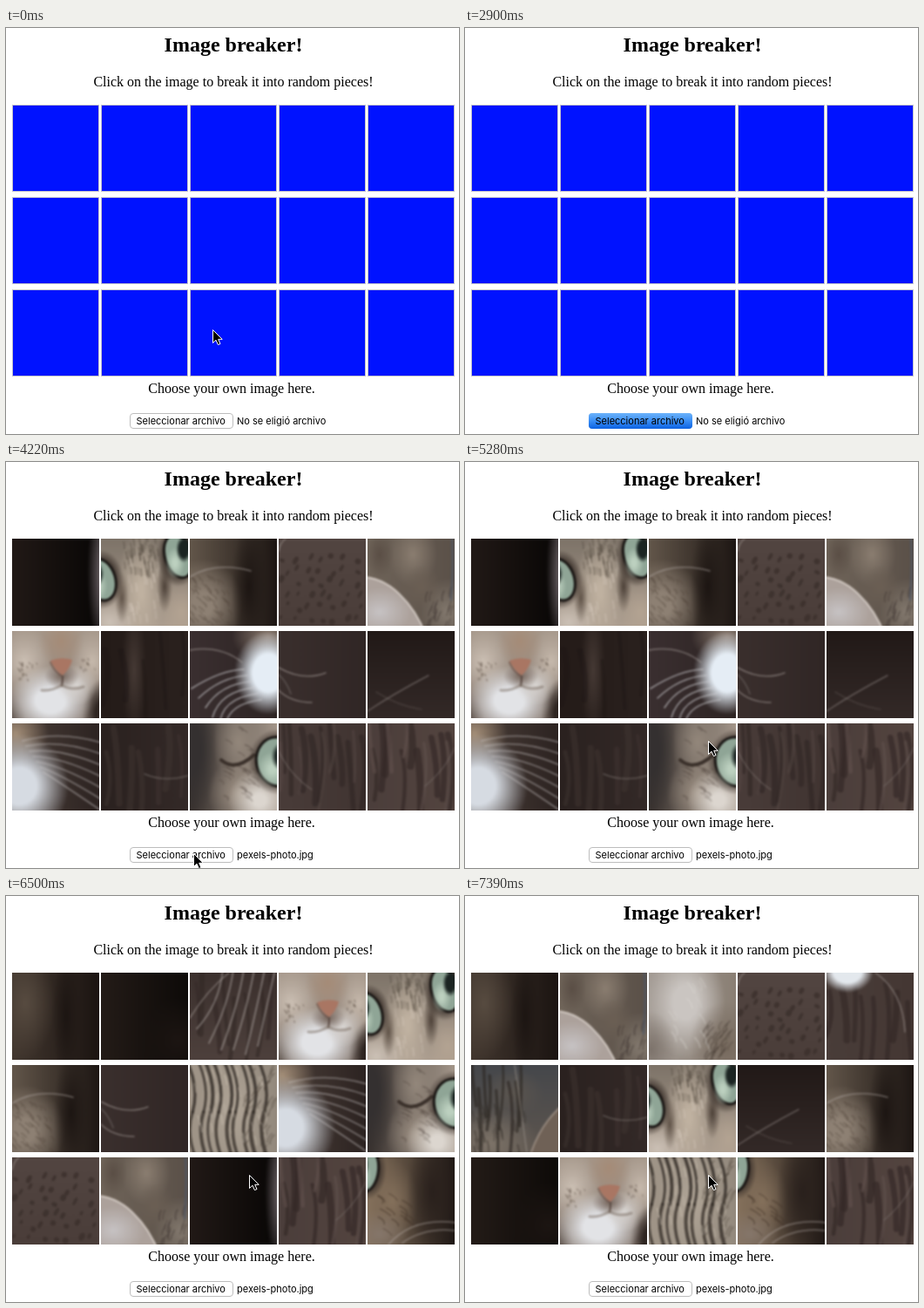
An HTML page with a canvas that plays this animation: 520 by 466 pixels, repeating every 8 s.

```html
<!DOCTYPE html>
<html lang="en">
<head>
<meta charset="utf-8">
<title>Image breaker!</title>
<style>
html, body { margin: 0; width: 100%; height: 100%; overflow: hidden; background: #fff; }
svg, canvas { position: absolute; left: 0; top: 0; }
.serif { font: 16px "Liberation Serif", "Times New Roman", serif; text-anchor: middle; }
.title { font-size: 24px; font-weight: bold; }
.ui { font: 11px Inter, Roboto, sans-serif; }
canvas, .press, .before, .after, .cursor { animation: 8s linear infinite; }
canvas, .press, .after { opacity: 0; }

/* hard cuts: 4220, 5960, 6500, 6920, 7390 ms */
.set0 { animation-name: set0; }
.set1 { animation-name: set1; }
.set2 { animation-name: set2; }
.set3 { animation-name: set3; }
.set4 { animation-name: set4; }
canvas, .press, .before, .after { animation-timing-function: step-end; }
@keyframes set0 { 0% { opacity: 0 } 52.75% { opacity: 1 } 74.5%, 100% { opacity: 0 } }
@keyframes set1 { 0% { opacity: 0 } 74.5% { opacity: 1 } 81.25%, 100% { opacity: 0 } }
@keyframes set2 { 0% { opacity: 0 } 81.25% { opacity: 1 } 86.5%, 100% { opacity: 0 } }
@keyframes set3 { 0% { opacity: 0 } 86.5% { opacity: 1 } 92.375%, 100% { opacity: 0 } }
@keyframes set4 { 0% { opacity: 0 } 92.375%, 100% { opacity: 1 } }

.press { animation-name: press; }
@keyframes press { 0% { opacity: 0 } 34% { opacity: 1 } 49.75%, 100% { opacity: 0 } }
.before { animation-name: before; }
@keyframes before { 0% { opacity: 1 } 52.75%, 100% { opacity: 0 } }
.after { animation-name: after; }
@keyframes after { 0% { opacity: 0 } 52.75%, 100% { opacity: 1 } }

.cursor { animation-name: move; }
@keyframes move {
  0%, 1.6% { transform: translate(237px, 346px) }
  3% { transform: translate(248px, 341px) }
  3.75% { transform: translate(257px, 345px) }
  4.4% { transform: translate(254px, 354px) }
  5.12%, 7.5% { transform: translate(246px, 363px) }
  9.5% { transform: translate(239px, 380px) }
  12% { transform: translate(222px, 417px) }
  14% { transform: translate(207px, 442px) }
  15.25%, 16.5% { transform: translate(203px, 449px) }
  17.125% { transform: translate(199px, 458px) }
  17.74% { transform: translate(199px, 464px) }
  17.75%, 26.74% { transform: translate(229px, 480px) }
  26.75% { transform: translate(229px, 461px) }
  29% { transform: translate(232px, 452px) }
  31.875%, 34% { transform: translate(237px, 447px) }
  36.24% { transform: translate(236px, 464px) }
  36.25%, 52.74% { transform: translate(236px, 480px) }
  52.75%, 57.2% { transform: translate(215px, 449px) }
  59.5% { transform: translate(224px, 425px) }
  62.5% { transform: translate(256px, 364px) }
  64.5% { transform: translate(276px, 329px) }
  66%, 100% { transform: translate(279px, 320px) }
}
</style>
</head>
<body>
<svg width="520" height="466">
  <defs>
    <linearGradient id="glow" x2="0" y2="1">
      <stop stop-color="#6cb3fa"/><stop offset=".5" stop-color="#3a8ef5"/><stop offset="1" stop-color="#0c62e2"/>
    </linearGradient>
    <pattern id="blank" width="102" height="106" x="7" y="88" patternUnits="userSpaceOnUse">
      <rect x=".5" y=".5" width="99" height="99" fill="#0012ff" stroke="#c4c4cc"/>
    </pattern>
  </defs>
  <text class="serif title" x="261" y="27">Image breaker!</text>
  <text class="serif" x="261" y="67">Click on the image to break it into random pieces!</text>
  <rect class="before" x="7" y="88" width="510" height="318" fill="url(#blank)"/>
  <text class="serif" x="259" y="419">Choose your own image here.</text>
  <rect x="142.5" y="442.5" width="118" height="17" rx="3.5" fill="#fff" stroke="#bdbdbd"/>
  <rect class="press" x="142" y="442" width="119" height="18" rx="4" fill="url(#glow)"/>
  <text class="ui" x="149.5" y="455">Seleccionar archivo</text>
  <text class="ui before" x="265" y="455">No se eligió archivo</text>
  <text class="ui after" x="265" y="455">pexels-photo.jpg</text>
</svg>
<script>
let g, seed;
const rnd = () => (seed = seed * 16807 % 2147483647) / 2147483647;

// linear fill with a margin for the blur; vertical when down is set
function fill(a, b = a, down) {
  const w = g.createLinearGradient(0, 0, down ? 0 : 100, down ? 100 : 0);
  w.addColorStop(0, a);
  w.addColorStop(1, b);
  g.fillStyle = w;
  g.fillRect(-10, -10, 120, 120);
}
// soft ellipse
function blob(x, y, rx, ry, c, core = 0) {
  g.save();
  g.translate(x, y);
  g.scale(rx, ry);
  const w = g.createRadialGradient(0, 0, 0, 0, 0, 1);
  w.addColorStop(core, c);
  w.addColorStop(1, c + '00');
  g.fillStyle = w;
  g.fillRect(-1, -1, 2, 2);
  g.restore();
}
function hair(x, y, cx, cy, x2, y2, c = '#b8b0ac77', w = 1.5) {
  g.strokeStyle = c;
  g.lineWidth = w;
  g.lineCap = 'round';
  g.beginPath();
  g.moveTo(x, y);
  g.quadraticCurveTo(cx, cy, x2, y2);
  g.stroke();
}
// short random strokes inside a box, leaning by dx
function fur(n, c, x, y, w, h, len = 9, dx = 2) {
  for (; n--;) {
    const px = x + rnd() * w, py = y + rnd() * h;
    hair(px, py, px + dx, py + len / 2, px + dx * (.5 + rnd()), py + len, c, 1 + rnd());
  }
}
// long vertical streaks
function streaks(n, c, w = 7, from = 0, to = 100) {
  for (let i = 0; i < n; i++) {
    const x = from + (to - from) * (i + rnd() * .6) / n, y = rnd() * 50 - 15;
    hair(x, y, x + 9 * rnd(), y + 30, x - 5 + 12 * rnd(), y + 50 + 40 * rnd(), c, w * (.5 + rnd() * .6));
  }
}
function oval(x, y, rx, ry, c, tilt = 0) {
  g.fillStyle = c;
  g.beginPath();
  g.ellipse(x, y, rx, ry, tilt, 0, 7);
  g.fill();
}
// iris with a dark rim; the pupil sits dx, dy off its centre
function eye(x, y, rx, ry, tilt, dx, dy) {
  blob(x, y, rx + 9, ry + 9, '#3a302a', .6);
  oval(x, y, rx + 1, ry + 1, '#1a1614', tilt);
  oval(x, y, rx - 2, ry - 2, '#8fa596', tilt);
  blob(x - rx * .25, y + ry * .3, rx * .7, ry * .7, '#bcd0bf', .2);
  blob(x + dx, y + dy, rx * .55, ry * .6, '#1b2422', .6);
}
function shape(path, c, edge) {
  const p = new Path2D(path);
  g.fillStyle = c;
  g.fill(p);
  if (edge) {
    g.strokeStyle = edge;
    g.lineWidth = 2;
    g.stroke(p);
  }
}

const pieces = {
  a() { fill('#211916', '#080605'); blob(108, 40, 22, 95, '#8d8186'); },
  b() {
    fill('#7d7368', '#ab9d8f', 1);
    blob(46, 60, 28, 70, '#bfb1a0', .1);
    blob(10, 96, 34, 32, '#cbc0b5');
    blob(92, 85, 26, 36, '#b3a392');
    fur(45, '#4f463d77', 26, -5, 40, 42, 8, 1);
    fur(25, '#e0d6ca55', 30, 20, 36, 70, 9, 1);
    blob(24, 68, 8, 30, '#5f5247');
    blob(73, 55, 9, 30, '#4d4138');
    eye(0, 47, 17, 25, -.3, -6, -6);
    eye(89, 20, 16, 26, -.3, 6, -8);
  },
  c() {
    fill('#62564a', '#1d1613');
    blob(15, 75, 46, 52, '#8d8073', .25);
    fur(50, '#4f443a66', -3, 38, 48, 60, 5, 4);
    blob(68, 55, 20, 75, '#1c1512');
    hair(0, 44, 28, 26, 70, 37);
  },
  d() {
    fill('#524541', '#4a3d39', 1);
    for (let i = 0; i < 42; i++)
      oval(2 + i % 7 * 14 + rnd() * 9, 18 + (i / 7 | 0) * 14 + rnd() * 9, 1.5 + rnd() * 2, 2 + rnd() * 3, '#3b2f2ccc', .5);
    hair(0, 14, 2, 4, 8, 0);
  },
  e() {
    fill('#6f6459', '#5a5048');
    blob(52, 18, 28, 38, '#8a7d70');
    blob(14, 18, 16, 28, '#5a4e45');
    blob(92, 85, 32, 40, '#83796e');
    blob(62, 55, 22, 26, '#6b5f54');
    fur(18, '#39302c66', 68, 55, 32, 40, 11, -3);
    hair(97, 0, 99, 30, 96, 70, '#4f566599', 3);
    shape('M-14 44Q14 42 36 63T68 114H-14Z', '#aca19b', '#d0c7c0');
    blob(14, 84, 36, 28, '#c6c2c3');
  },
  f() {
    fill('#a5978a', '#8a7e76', 1);
    blob(14, 35, 34, 40, '#cbbfb3');
    blob(92, 35, 26, 38, '#c6b9ac');
    blob(-4, 104, 20, 34, '#5c524c');
    blob(106, 96, 26, 42, '#2e2521', .4);
    blob(44, 80, 48, 40, '#e2e3e6', .35);
    blob(74, 62, 24, 24, '#d8d4d1');
    fur(18, '#55483e77', 2, 34, 30, 22, 2, 1);
    fur(10, '#55483e66', 76, 30, 22, 20, 2, 1);
    blob(56, 12, 26, 32, '#a58b77');
    blob(57, 52, 20, 14, '#75655c');
    shape('M44 34Q56 29 69 33Q66 44 58 51Q49 45 44 34Z', '#a97663');
    hair(44, 36, 48, 46, 56, 51, '#64483d99', 2);
    hair(58, 52, 58, 58, 57, 63, '#5a4942', 2);
    hair(57, 62, 46, 69, 34, 68, '#7d706888', 3);
    hair(57, 62, 68, 69, 82, 64, '#7d706888', 3);
  },
  g() { fill('#241b18', '#2a211e'); blob(38, 45, 14, 75, '#453934'); streaks(5, '#1d161466', 8); },
  h() {
    fill('#3a2f30', '#2d2423');
    blob(90, 6, 42, 30, '#8c7c70');
    blob(90, 48, 39, 48, '#e5edf5', .45);
    for (let i = 0; i < 6; i++) hair(62 + i * 4, 44 + i * 7, 35, 45 + i * 8, 2 + i * 8, 66 + i * 11, '#d2d2d699', 1.6);
    hair(60, 36, 35, 16, 0, 22);
  },
  i() {
    fill('#3a2f2d', '#302625');
    hair(0, 42, 28, 58, 54, 48);
    hair(0, 68, 14, 82, 38, 82);
    hair(0, 50, 9, 58, 14, 72, '#a39b9855');
  },
  j() { fill('#211917', '#332927', 1); hair(0, 92, 30, 72, 70, 51, '#aaa19d66'); hair(10, 70, 35, 86, 62, 90, '#8f868433'); },
  k() {
    fill('#4a3e38', '#2c2321');
    blob(4, 12, 38, 36, '#a38e78');
    blob(8, 72, 57, 60, '#d6dbe2', .35);
    for (let i = 0; i < 7; i++) hair(12 + i * 4, 20 + i * 6, 55, 8 + i * 10, 102, 22 + i * 13, '#c9c6c677', 1.6);
  },
  l() { fill('#2a211f', '#332927'); streaks(7, '#42363377', 7); hair(50, 58, 72, 68, 100, 60, '#958c8866'); },
  m() {
    fill('#37302d', '#a3968a');
    blob(56, 22, 30, 50, '#93877b');
    blob(56, 80, 36, 40, '#9d9083');
    blob(80, 88, 36, 36, '#dcd6cf', .2);
    blob(4, 30, 28, 80, '#343030', .3);
    fur(30, '#443a3355', 32, 0, 40, 85, 5, 7);
    hair(36, 42, 52, 56, 74, 36, '#3a302a', 4);
    eye(101, 44, 25, 29, -.25, 6, -6);
  },
  n() { fill('#493c39', '#403431'); streaks(9, '#30262499', 7); streaks(5, '#57494677', 4); hair(0, 32, 14, 60, 38, 76, '#8e848166'); },
  o() { fill('#4b3e3b', '#53443f'); streaks(9, '#332826aa', 8); streaks(5, '#63534f88', 5); hair(100, 28, 90, 52, 66, 72, '#8e848155'); },
  p() {
    fill('#3b302d', '#4d403c', 1);
    streaks(8, '#33282699', 6);
    for (let i = 0; i < 6; i++) hair(38 + i * 12, -4, 34 + i * 11, 36, 8 + i * 14, 60 + rnd() * 42, '#b5adaa88', 1.8);
    hair(45, 0, 20, 20, 0, 52);
  },
  q() {
    fill('#85715c', '#1f1815');
    blob(28, 50, 30, 48, '#84705b');
    blob(14, 88, 34, 28, '#85766a');
    blob(75, 40, 30, 70, '#29201c');
    fur(14, '#43342988', 12, 35, 36, 48, 8, 8);
    eye(-2, 14, 15, 26, .1, -5, -5);
    hair(24, 100, 52, 68, 102, 75);
    hair(40, 98, 66, 80, 100, 84);
  },
  r() { fill('#231b17', '#0d0a08'); blob(88, 78, 40, 50, '#1c1512'); },
  s() {
    fill('#a29a93', '#8a7f74');
    blob(42, 34, 46, 64, '#cac5c1', .3);
    blob(2, 88, 30, 44, '#7c726a');
    blob(88, 85, 42, 52, '#76695d');
    fur(30, '#40363066', 68, 50, 32, 48, 9, -5);
    fur(15, '#e2ddd755', 20, 5, 45, 80, 11, 5);
  },
  t() {
    fill('#45474b', '#5d554e', 1);
    blob(48, 32, 35, 28, '#5b554f');
    blob(22, 90, 56, 42, '#7d7368');
    streaks(9, '#2a242099', 4, 0, 62);
    fur(30, '#2b252166', 0, 45, 62, 50, 12, 2);
    shape('M66 110Q78 66 110 42V110Z', '#6f6156', '#94877c');
    hair(50, 0, 57, 50, 64, 100, '#a89f9777');
  },
  u() {
    fill('#4c4038', '#2c2320');
    shape('M-4 72Q18 24 52 2Q63 32 54 62T44 110H-4Z', '#a59b93', '#d0c7bf');
    blob(22, 65, 22, 38, '#c4bdb7');
    blob(10, 95, 30, 24, '#80756b');
    fur(16, '#685b5066', 0, 60, 36, 36, 12, 5);
  },
  v() {
    fill('#a09588', '#948a7e');
    blob(50, 50, 40, 75, '#b0a597');
    for (let i = 0; i < 9; i++) {
      const x = i * 10 - 6 + rnd() * 4;
      hair(x, -8, x + 16, 25, x + 8, 54, '#2f2823cc', 2.5 + rnd() * 2);
      hair(x + 8, 54, x, 78, x + 12, 108, '#2f2823bb', 2.5 + rnd() * 2);
    }
    fur(40, '#4d433a66', 66, 0, 36, 95, 10, -5);
    fur(30, '#cfc5b766', 0, 0, 95, 95, 10, 2);
  },
  w() { fill('#42372f', '#1b1411'); blob(15, 35, 34, 65, '#574b40'); blob(62, 50, 16, 80, '#1c1512'); },
  x() {
    fill('#493d39', '#443733');
    streaks(8, '#32272599', 7);
    blob(24, -2, 30, 25, '#e3e8ed', .55);
    hair(56, 0, 88, 22, 90, 68);
  },
  y() {
    fill('#332a25', '#080605');
    blob(60, 45, 28, 80, '#0a0706');
    shape('M110 42Q86 38 88 66Q90 86 96 110H110Z', '#8d857e', '#c9c3be');
  }
};

function makeCanvas(w, h) {
  const canvas = document.createElement('canvas');
  canvas.width = w;
  canvas.height = h;
  return canvas;
}
// each piece is painted once, with a margin of 10
const tiles = {};
for (const name in pieces) {
  tiles[name] = makeCanvas(120, 120);
  g = tiles[name].getContext('2d');
  g.translate(10, 10);
  seed = name.charCodeAt(0) * 7919;
  pieces[name]();
}

const sets = ['abcdefghijklmno', 'pdyimqcljrsbntu', 'wrpfbcivkmdeaoq', 'nmkauhsifybjvxg', 'wesdxtlbjcrfvqo'];
sets.forEach((names, n) => {
  const canvas = makeCanvas(520, 466);
  canvas.className = 'set' + n;
  document.body.append(canvas);
  g = canvas.getContext('2d');
  [...names].forEach((name, i) => {
    const x = 7 + i % 5 * 102, y = 88 + Math.floor(i / 5) * 106;
    g.save();
    g.beginPath();
    g.rect(x, y, 100, 100);
    g.clip();
    g.filter = 'blur(1px)';
    g.drawImage(tiles[name], x - 10, y - 10);
    g.restore();
  });
});
</script>
<svg width="520" height="466">
  <path class="cursor" d="M.5 .5V15.5L4 12.2L6.4 17.6L9 16.5L6.7 11.3H11.2Z" fill="#000" stroke="#fff"/>
</svg>
</body>
</html>
```
